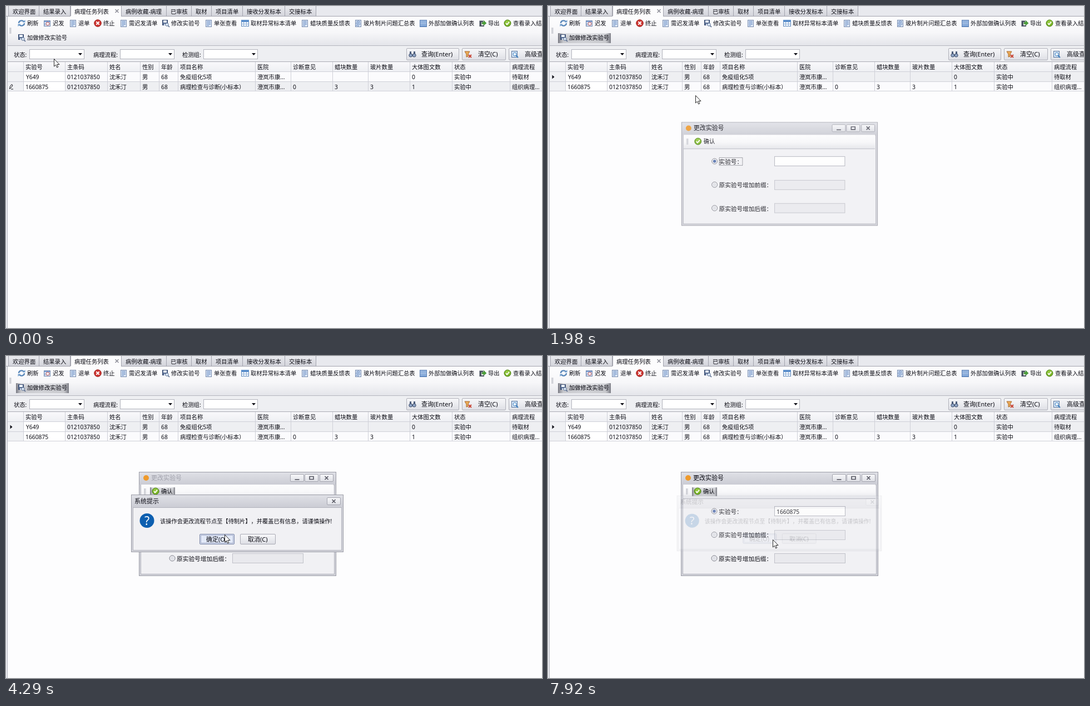
An HTML page that plays this animation: 964x581 px, repeating every 8000 ms.

```html
<!DOCTYPE html>
<html lang="zh-CN">
<head>
<meta charset="utf-8">
<title>病理任务列表</title>
<style>
html, body { margin: 0; width: 100%; height: 100%; overflow: hidden; background: #fdfdfe; }
svg { display: block; width: 964px; height: 581px; }
text {
  font-family: "Noto Sans", "Noto Sans CJK SC", "Noto Sans CJK", sans-serif;
  font-kerning: none; text-spacing-trim: space-all; font-feature-settings: "chws" 0, "halt" 0;
  white-space: pre;
}
</style>
</head>
<body>
<svg id="stage" viewBox="0 0 964 581" width="964" height="581"></svg>
<script>
const INK = '#0c0c14', EDGE = '#a3a4ae', LINE = '#cfd0d8';

// Boxes with a border are aligned to whole pixels.
const box = (x, y, w, h, fill, stroke, extra = '') => stroke
  ? `<rect x="${x + .5}" y="${y + .5}" width="${w - 1}" height="${h - 1}" fill="${fill}" stroke="${stroke}" ${extra}/>`
  : `<rect x="${x}" y="${y}" width="${w}" height="${h}" fill="${fill}" ${extra}/>`;
const label = (x, y, s, size = 10.3, fill = INK, extra = '') =>
  `<text x="${x}" y="${y + 4}" font-size="${size}" fill="${fill}" ${extra}>${s}</text>`;
const path = (d, fill, stroke = 'none', extra = '') =>
  `<path d="${d}" fill="${fill}" stroke="${stroke}" ${extra}/>`;
const disc = (x, y, r, fill, stroke = 'none') =>
  `<circle cx="${x}" cy="${y}" r="${r}" fill="${fill}" stroke="${stroke}"/>`;
const group = (id, body, extra = '') => `<g id="${id}" ${extra}>${body}</g>`;
const at = (x, y, body) => `<g transform="translate(${x} ${y})">${body}</g>`;
const gradient = (id, stops, across) =>
  `<linearGradient id="${id}" x2="${across ? 1 : 0}" y2="${across ? 0 : 1}">` +
  stops.map(([o, c, a = 1]) => `<stop offset="${o}" stop-color="${c}" stop-opacity="${a}"/>`).join('') +
  '</linearGradient>';

const defs = '<defs>' +
  gradient('tab', [[0, '#e9eaee'], [1, '#d3d4db']]) +
  gradient('bar', [[0, '#fdfdfe'], [.55, '#f7f7f9'], [1, '#e4e5ea']]) +
  gradient('head', [[0, '#f9f9fb'], [1, '#eeeff3']]) +
  gradient('btn', [[0, '#f7f7f9'], [.5, '#ebecf0'], [1, '#dddee4']]) +
  gradient('cap', [[0, '#dfe0e6'], [1, '#cbccd4']]) +
  gradient('hot', [[0, '#e9eaed'], [.5, '#c9cacf'], [1, '#d3d4d8']]) +
  gradient('sides', [[0, '#62636c', .8], [.1, '#85868e', .12], [.5, '#85868e', 0], [.9, '#85868e', .12], [1, '#62636c', .8]], true) +
  '</defs>';

const sheet = box(-5, -6, 11, 13, '#e3ecf8', '#7489ae') +
  path('M-3 -3.5H4M-3 -1.5H4M-3 .5H4M-3 2.5H4M-3 4.5H1', 'none', '#6d8fc4');
const disk = box(-6, -6, 10, 10, '#53698f', '#35486d') + box(-4, -5, 6, 4, '#eef3fa') + box(-3, 1, 4, 3, '#cbd5e5');
const check = disc(0, 0, 6, '#74ad25', '#4e8417') + disc(0, -1, 4.3, '#93c83f') +
  path('M-3 0L-1 2.5L3.2 -2.5', 'none', '#fff', 'stroke-width="1.8"');
const icons = {
  sheet, disk, check,
  refresh: path('M-5 0A5 4.5 0 0 1 4 -2.8M5 0A5 4.5 0 0 1 -4 2.8', 'none', '#5685b8', 'stroke-width="2.2"') +
    path('M1.5 -1.5H6.5V-6ZM-1.5 1.5H-6.5V6Z', '#6f9ccb'),
  late: box(-6, -5, 12, 11, '#dde6f4', '#7489ae') + box(-5, -4, 10, 2, '#7ea2d6') +
    disc(1, 1, 3, '#f7f1f1', '#b4525a') + path('M-4 0V4', 'none', '#6d8fc4'),
  stop: disc(0, 0, 6.3, '#cf3430', '#982320') + path('M-2.7 -2.7L2.7 2.7M2.7 -2.7L-2.7 2.7', 'none', '#fff', 'stroke-width="2"'),
  find: disk + disc(2.5, 2.5, 2.7, '#e0edfa', '#506589') + path('M4.5 4.5L7 7', 'none', '#506589', 'stroke-width="1.6"'),
  table: box(-7, -6, 14, 12, '#f4f8fd', '#5c87bb') + box(-7, -6, 14, 4, '#5b8fcb') +
    path('M-6 1.5H6M-2.5 -2V6M2.5 -2V6', 'none', '#8badd5'),
  slide: sheet + path('M-4 5L4 -4M-4 1L1 -5M0 6L5 1', 'none', '#8fa9d0'),
  list: box(-6, -6, 13, 13, '#dfeaf8', '#5c80b4') + path('M-5 -3.5H6M-5 -.5H6M-5 2.5H6M-5 5H6', 'none', '#4b7fc4', 'stroke-width="1.4"'),
  leave: path('M-5.5 -4.5H1V-2H-2V4H3V6H-5.5Z', '#4a5361') + path('M-1 -1.5H2V-5L7 0L2 4V1.5H-1Z', '#4da33b', '#2f7525', 'stroke-width=".6"'),
  glasses: box(-5, -5, 3, 5, '#4f5f7c') + box(2, -5, 3, 5, '#4f5f7c') + disc(-3.2, 2, 3, '#8fa4c5', '#3c4b68') + disc(3.2, 2, 3, '#8fa4c5', '#3c4b68'),
  clear: path('M-6 -5H3L0 0V4L-3 5V0Z', '#ecab57', '#a7692c') + path('M1 1L6 6M6 1L1 6', 'none', '#c8402f', 'stroke-width="1.8"'),
  zoom: box(-6, -6, 11, 12, '#d9e7f7', '#55759f') + disc(0, 0, 3, '#f5faff', '#377bbd') + path('M2 2L6 6', 'none', '#377bbd', 'stroke-width="1.8"'),
};
const icon = (x, y, name) => at(x, y, icons[name]);
const hot = (x, y, w, h) => box(x, y, w, h, 'url(#hot)') + box(x, y, w, h, 'url(#sides)');
const grip = (x, y) => box(x, y, 4, 11, '#dcdde2') + box(x + 1, y, 1, 11, '#c5c6cd');
const dotted = 'stroke-dasharray="1 1"';

function tabs() {
  const edges = [5, 60, 116, 208, 289, 334, 370, 426, 502, 558];
  const names = ['欢迎界面', '结果录入', '病理任务列表', '病例收藏-病理', '已审核', '取材', '项目清单', '接收分发标本', '交接标本'];
  let s = box(0, 0, 964, 19, '#e8e9ee') + box(0, 18, 964, 1, EDGE);
  names.forEach((name, i) => {
    const x = edges[i], w = edges[i + 1] - x, on = i === 2;
    s += on ? box(x, -1, w, 20, '#fcfcfd') + box(x, 0, 1, 18, EDGE) + box(x + w, 0, 1, 18, EDGE)
            : box(x - 1, -1, w + 1, 20, 'url(#tab)', EDGE);
    s += label(x + 7, 10, name);
  });
  return s + path('M196.500 6L202.500 12M202.500 6L196.500 12', 'none', '#8b8c96', 'stroke-width="1.5"');
}

function toolbar() {
  const items = [[38, '刷新', 'refresh'], [84, '迟发', 'late'], [130, '退单', 'sheet'], [175, '终止', 'stop'],
    [221, '需迟发清单', 'sheet'], [297, '修改实验号', 'find'], [374, '单张查看', 'sheet'], [440, '取材异常标本清单', 'table'],
    [547, '蜡块质量反馈表', 'sheet'], [643, '玻片制片问题汇总表', 'slide'], [760, '外部加做确认列表', 'list'],
    [867, '导出', 'leave'], [912, '查看录入结果', 'check']];
  return box(2, 19, 962, 52, 'url(#bar)') + box(2, 71, 962, 1, '#b4b5be') + grip(6, 39) +
    group('hotAdd', hot(18, 49, 95, 18)) +
    items.map(([x, s, i]) => icon(x - 10, 31, i) + label(x, 31, s)).join('') +
    icon(28, 57, 'find') + label(38, 57, '加做修改实验号');
}

function filters() {
  const combos = [[14, '状态:', 42, 99], [157, '病理流程:', 205, 98], [317, '检测组:', 355, 98]];
  const buttons = [[720, 95, '查询(Enter)', 'glasses', 747], [820, 79, '清空(C)', 'clear', 849], [904, 80, '高级查询', 'zoom', 933]];
  return box(2, 72, 962, 29, '#eeeff2') +
    combos.map(([x, s, bx, w]) => label(x, 88, s) + box(bx, 78, w, 18, '#fff', '#b3b4bd') +
      path(`M${bx + w - 11} 85H${bx + w - 4}L${bx + w - 7.5} 89Z`, INK)).join('') +
    buttons.map(([x, w, s, i, tx]) => box(x, 76, w, 22, 'url(#btn)', '#b0b1ba', 'rx="1.5"') +
      icon(x + 11, 87, i) + label(tx, 87, s, 11)).join('');
}

function table() {
  const cols = [32, 107, 183, 242, 276, 310, 449, 513, 588, 652, 727, 803, 907];
  const rows = ['实验号,主条码,姓名,性别,年龄,项目名称,医院,诊断意见,蜡块数量,玻片数量,大体图文数,状态,病理流程',
    'Y649,0121037850,沈禾汀,男,68,免疫组化5项,澄岚市康...,,,,0,实验中,待取材',
    '1660875,0121037850,沈禾汀,男,68,病理检查与诊断(小标本）,澄岚市康...,0,3,3,1,实验中,组织病理...'];
  return box(2, 100, 962, 19, 'url(#head)') + box(2, 100, 962, 1, '#aaabb4') +
    box(2, 119, 30, 35, '#f0f1f4') +
    box(32, 119, 932, 17, '#fbfbfd', '', 'id="row1"') + box(32, 137, 932, 17, '#fbfbfd', '', 'id="row2"') +
    box(32, 119, 75, 35, '#fff') +
    [118, 136, 153].map(y => box(2, y, 962, 1, LINE)).join('') +
    cols.map(x => box(x - 1, 101, 1, 53, LINE)).join('') +
    group('focusLines', path('M32 119.500H964M32 135.500H964', 'none', '#59617a', dotted)) +
    rows.map((row, r) => row.split(',').map((s, c) =>
      label(cols[c] + (r === 1 && c === 0 ? 4 : 3), [110, 128, 146][r], s)).join('')).join('') +
    group('pen', path('M6.500 149.500L7.500 145L10 141.500L12 143L9.500 147ZM9 150H13', '#fff', INK)) +
    group('pointer', path('M7.500 124.500L11.500 128L7.500 131.500Z', INK)) +
    box(0, 19, 2, 562, '#eeeff3') + box(2, 19, 1, 562, '#b0b1ba');
}

function frame(x, y, w, h, cap) {
  return box(x, y, w, h, '#d3d4db', '#9b9ca6') + box(x + 1, y + 1, w - 2, cap - 1, 'url(#cap)') +
    box(x + 3, y + cap, w - 6, h - cap - 3, '#f1f1f4', '#b2b3bc');
}
const capButton = (x, y, glyph) => box(x, y, 25, 14, 'url(#btn)', '#a5a6b0', 'rx="1.5"') +
  at(x + 12.5, y + 7, path(glyph, 'none', '#555661', 'stroke-width="1.6"'));
const CROSS = 'M-3 -3L3 3M3 -3L-3 3';

function editDialog() {
  const radio = (y, on) => disc(299, y, 5, '#f4f5f8', '#7c7d88') + disc(299, y, 3.4, '#dfe0e6') + (on ? disc(299, y, 2.7, '#536fac') : '');
  const field = (y, on) => box(407, y, 128, 18, on ? '#fff' : '#e9e9ed', on ? '#aeafb9' : '#c0c1c9');
  return frame(239, 209, 355, 188, 23) + disc(252, 220, 5, '#ee9a2c') +
    label(261, 220, '更改实验号', 11, INK, 'id="caption"') +
    capButton(511, 213, 'M-4 3H4') + capButton(537, 213, 'M-3.500 -2.500H3.500V2.500H-3.500Z') + capButton(564, 213, CROSS) +
    box(243, 232, 346, 25, 'url(#bar)') + box(243, 257, 346, 1, '#b5b6bf') + grip(248, 239) +
    group('hotOk', hot(259, 237, 45, 16)) + icon(269, 244, 'check') + label(279, 244, '确认') +
    radio(280, true) + radio(322.500) + radio(365) + field(271, true) + field(314) + field(356) +
    group('ring', box(307, 273, 43, 15, 'none', '#44454f', dotted)) +
    label(307, 281, '实验号：', 10.7) + label(307, 323, '原实验号增加前缀：', 10.7) + label(307, 366, '原实验号增加后缀：', 10.7) +
    group('typed', label(411, 281, '1660875')) + group('caret', box(0, 274, 1, 12, INK));
}

function promptDialog() {
  return frame(225, 250, 382, 104, 23) + label(231, 262, '系统提示', 11) + capButton(577, 255, CROSS) +
    disc(253.500, 297, 13, '#0d5fb0') +
    label(253.500, 298.500, '?', 21, '#fff', 'text-anchor="middle" dy="2"') +
    label(277, 298, '该操作会更改流程节点至【待制片】，并覆盖已有信息，请谨慎操作!', 10.23) +
    box(348, 321, 63, 19, '#e2e9f8', '#7480a2', 'rx="1.5"') + box(350, 323, 59, 15, 'none', '#5c6892', dotted) + label(360, 331, '确定(O)', 11) +
    box(421, 321, 64, 19, 'url(#btn)', '#a9aab4', 'rx="1.5"') + label(435, 331, '取消(C)', 11);
}

const stage = document.getElementById('stage');
stage.innerHTML = defs + box(0, 0, 964, 581, '#fdfdfe') + toolbar() + filters() + table() + tabs() +
  group('edit', editDialog()) + group('prompt', promptDialog()) +
  group('arrow', path('M.5 .5V14L3.500 11.200L5.700 16L7.800 15L5.700 10.500H10Z', '#fff', '#111', 'stroke-width=".9"')) +
  group('beam', path('M-3 -7.500H-1L0 -6.500L1 -7.500H3M0 -6.500V6.500M-3 7.500H-1L0 6.500L1 7.500H3', 'none', '#111'));

const el = id => document.getElementById(id);
const show = (id, on) => el(id).setAttribute('visibility', on ? 'visible' : 'hidden');
const STEP = 330, LOOP = 8000;

// Mouse position, held for one step each.
const track = [[86, 95], [52, 62], [94, 114], [24, 129], [58, 69], [64, 60], [265, 161], [432, 263], [432, 278],
  [298, 257], [286, 242], [340, 280], [397, 309], [393, 322], [390, 293], [325, 310], [278, 310], [351, 307],
  [456, 303], [533, 299], [570, 300], [582, 300], [422, 339], [404, 331], [404, 331]];

function fade(id, alpha, scale, cx, cy) {
  show(id, alpha > 0);
  el(id).setAttribute('opacity', alpha);
  el(id).setAttribute('transform', `translate(${cx} ${cy}) scale(${scale}) translate(${-cx} ${-cy})`);
}

function draw(time) {
  const n = Math.floor(time % LOOP / STEP);
  const [x, y] = track[n];
  const asking = n >= 11 && n < 24, beam = n === 8;

  show('arrow', !beam);
  show('beam', beam);
  el(beam ? 'beam' : 'arrow').setAttribute('transform', `translate(${x} ${y})`);

  el('row1').setAttribute('fill', n < 4 ? '#fbfbfd' : n < 6 ? '#e0e8f8' : '#eeeff2');
  el('row2').setAttribute('fill', n < 4 ? '#eeeff2' : '#fbfbfd');
  show('focusLines', n === 4 || n === 5);
  show('pen', n < 4);
  show('pointer', n >= 4);
  show('hotAdd', n >= 5);

  fade('edit', n < 6 ? 0 : n === 6 ? .88 : 1, n === 6 ? .995 : 1, 416, 303);
  show('ring', n === 6 || n === 7);
  show('typed', n >= 9);
  show('caret', n >= 8 && n <= 10);
  el('caret').setAttribute('transform', `translate(${n === 8 ? 411 : 453} 0)`);
  show('hotOk', n >= 10);
  el('caption').setAttribute('fill', asking ? '#a2a3ad' : INK);

  fade('prompt', n === 11 ? .9 : asking ? 1 : n === 24 ? .18 : 0, n === 11 ? .995 : n === 24 ? .965 : 1, 416, 302);
}

const start = performance.now();
function tick() {
  draw(performance.now() - start);
  requestAnimationFrame(tick);
}
tick();
</script>
</body>
</html>
```
